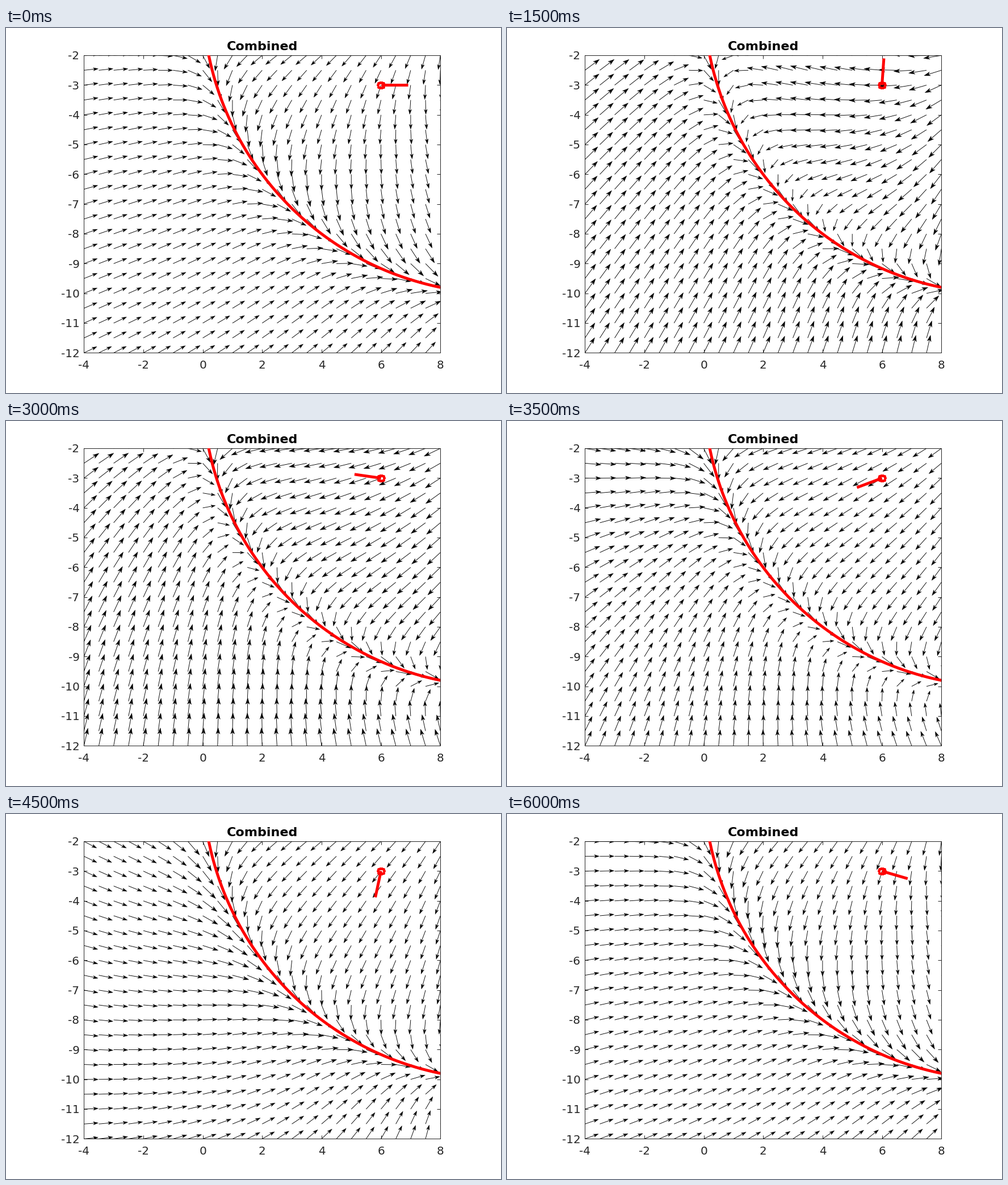
Write a matplotlib script that moves like this. It is 872 px wide and 642 px high and loops after 6500 ms.

```python
import numpy as np
import matplotlib.pyplot as plt
from matplotlib.animation import FuncAnimation
from matplotlib.collections import LineCollection, PolyCollection

W, H = 872, 642
DPI = 64
PX = 72 / DPI            # one pixel in points
FRAMES, STEP_MS = 13, 500

CENTER, RADIUS = np.array([10.0, 0.0]), 10.0   # circular path to follow
DRIFT = 0.6              # strength of the rotating drift
GAIN = 1.5               # how sharply the field turns onto the path
AGENT = np.array([6.0, -3.0])
POINTER = 0.9
INK = (0.15, 0.15, 0.15)

plt.rcParams["font.family"] = "DejaVu Sans"
fig = plt.figure(figsize=(W / DPI, H / DPI), dpi=DPI, facecolor="white")

# Plot box in pixels, measured from the top left
BOTTOM, BOX_H = 571.4, 0.815 * H
BOX_W = BOX_H * 1.2
LEFT = 0.5175 * W - BOX_W / 2
UNIT = BOX_H / 10

ax = fig.add_axes([LEFT / W, 1 - BOTTOM / H, BOX_W / W, BOX_H / H])
ax.set_xlim(-4, 8)
ax.set_ylim(-12, -2)
ax.set_axisbelow(True)
ax.set_xticks(range(-4, 9, 2))
ax.set_yticks(range(-12, -1))
ax.tick_params(direction="in", length=6 * PX, width=PX, color=INK,
               top=True, right=True, labelbottom=False, labelleft=False)
for spine in ax.spines.values():
    spine.set(linewidth=PX, color=INK, zorder=0.6)


def label(x, y, text, size, **style):
    fig.text(x / W, 1 - y / H, text, fontsize=size * PX, va="baseline", **style)


for v in range(-4, 9, 2):
    label(LEFT + (v + 4) * UNIT, 599, str(v), 20, ha="center", color=INK)
for v in range(-12, -1):
    label(129.5, BOTTOM - (v + 12) * UNIT + 7.3, str(v), 20, ha="right", color=INK)
label(451.3, 39, "Combined", 22.3, ha="center", color="black", weight="bold")

# Grid of arrow tails, with the directions toward and along the path
gx, gy = np.meshgrid(np.arange(-4, 8.1, 0.5), np.arange(-12, -1.9, 0.5))
tails = np.column_stack([gx.ravel(), gy.ravel()])
offset = tails - CENTER
dist = np.hypot(*offset.T)[:, None]
radial = offset / dist
tangent = np.column_stack([-radial[:, 1], radial[:, 0]])
error = dist - RADIUS
approach = -np.sign(error) * radial
pull = np.tanh(GAIN * np.abs(error))
follow = np.sqrt(1 - pull ** 2)
MAX_LEN = 0.9 * np.hypot(12 / gx.shape[1], 10 / gx.shape[0])


def heading(t):
    return np.array([np.cos(t), np.sin(t)])


def field(t):
    steer = approach + DRIFT * heading(t)
    steer /= np.linalg.norm(steer, axis=1, keepdims=True)
    v = pull * steer + follow * tangent
    return v * MAX_LEN / np.linalg.norm(v, axis=1).max()


shafts = LineCollection([], colors="black", linewidths=0.9 * PX, zorder=2)
heads = PolyCollection([], facecolors="black", edgecolors="black",
                       linewidths=0.4 * PX, zorder=2)
ax.add_collection(shafts, autolim=False)
ax.add_collection(heads, autolim=False)

arc = np.linspace(np.pi, 1.5 * np.pi, 300)
ax.plot(CENTER[0] + RADIUS * np.cos(arc), CENTER[1] + RADIUS * np.sin(arc),
        color="red", lw=5 * PX, zorder=3)

ring = np.arange(10) * 2 * np.pi / 10
ax.plot(AGENT[0] + 0.1 * np.cos(ring), AGENT[1] + 0.1 * np.sin(ring), "o",
        color="red", ms=5 * PX, mew=0, zorder=4)
pointer, = ax.plot([], [], color="red", lw=5 * PX, zorder=4,
                   solid_capstyle="butt")


def update(i):
    t = 0.5 * i
    v = field(t)
    side = np.column_stack([-v[:, 1], v[:, 0]])
    tips = tails + v
    barb = tips - 0.34 * v
    shafts.set_segments(np.stack([tails, tips - 0.1 * v], axis=1))
    heads.set_verts(np.stack([tips, barb + 0.11 * side, tips - 0.25 * v,
                              barb - 0.11 * side], axis=1))
    end = AGENT + POINTER * heading(t)
    pointer.set_data([AGENT[0], end[0]], [AGENT[1], end[1]])
    return shafts, heads, pointer


anim = FuncAnimation(fig, update, frames=FRAMES, interval=STEP_MS, repeat=True)
plt.show()
```
